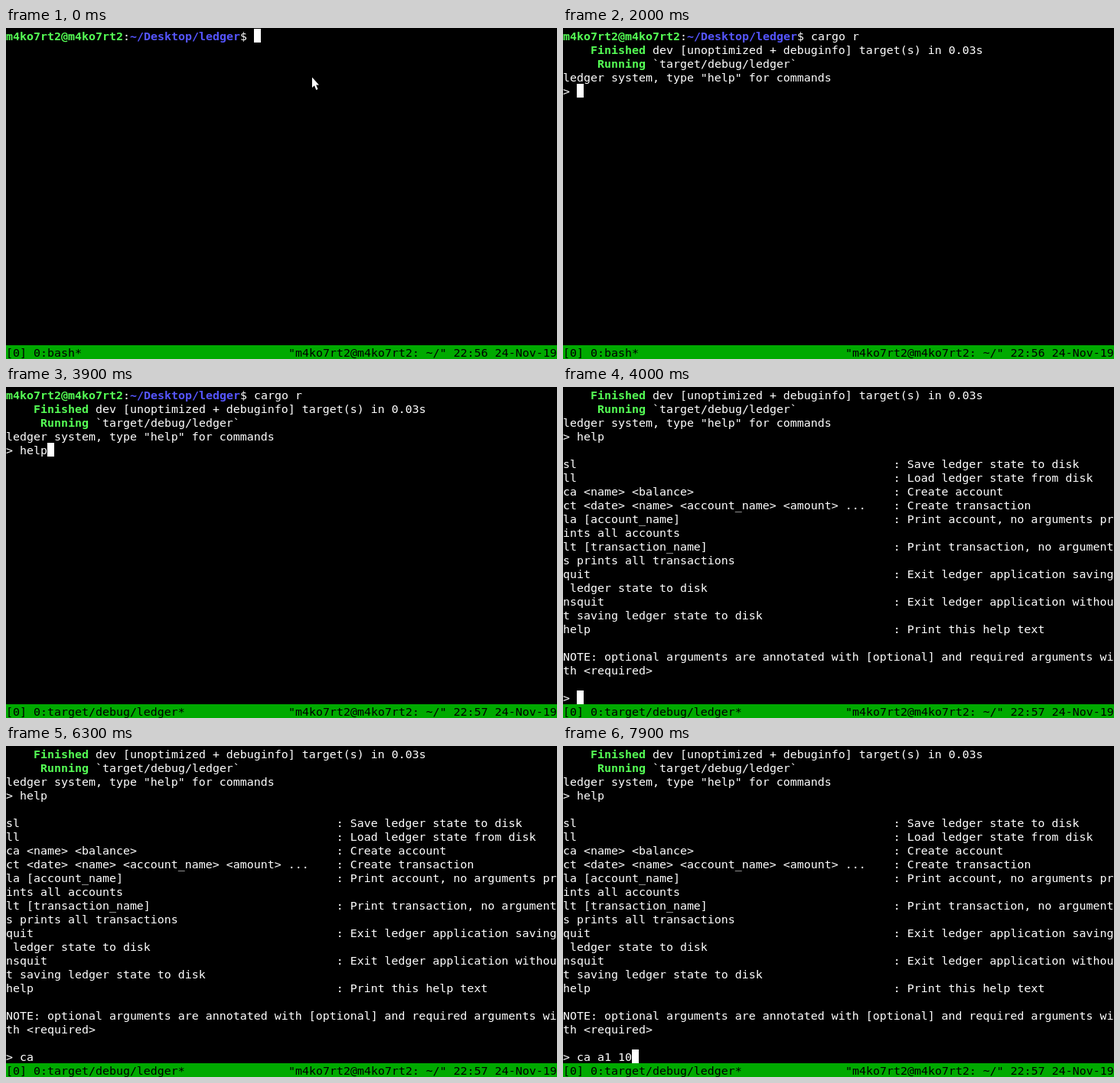
These frames come from a looping animation (720 px wide and 433 px high, 8000 ms). An HTML page with a canvas:

```html
<!DOCTYPE html>
<html lang="en">
<head>
<meta charset="utf-8">
<title>Ledger terminal</title>
<style>
  html, body { margin: 0; width: 100%; height: 100%; overflow: hidden; background: #000; }
  canvas { display: block; }
</style>
</head>
<body>
<canvas id="stage" width="720" height="433"></canvas>
<script>
const ctx = document.getElementById('stage').getContext('2d');
const LOOP = 8000, CW = 9, CH = 18, COLS = 80;
const WHITE = '#fff', GREEN = '#55ff55', BLUE = '#5555ff', BAR = '#00aa00';
const FONT = '14.949px "DejaVu Sans Mono", monospace'; // advance of 9px
const USER = 'm4ko7rt2@m4ko7rt2';

const help = [
  ['sl', 'Save ledger state to disk'],
  ['ll', 'Load ledger state from disk'],
  ['ca <name> <balance>', 'Create account'],
  ['ct <date> <name> <account_name> <amount> ...', 'Create transaction'],
  ['la [account_name]', 'Print account, no arguments prints all accounts'],
  ['lt [transaction_name]', 'Print transaction, no arguments prints all transactions'],
  ['quit', 'Exit ledger application saving ledger state to disk'],
  ['nsquit', 'Exit ledger application without saving ledger state to disk'],
  ['help', 'Print this help text'],
].map(([cmd, text]) => cmd.padEnd(48) + ': ' + text);
const note = 'NOTE: optional arguments are annotated with [optional] and required arguments with <required>';
const helpRows = ['', ...help, '', note, ''].flatMap(wrap);

// [time, screen, typed text, cursor shown]
const steps = [
  [0, 'shell', '', 1], [200, 'shell', '', 0], [300, 'shell', '', 1],
  [400, 'shell', 'c', 1], [500, 'shell', 'ca', 1], [600, 'shell', 'car', 1],
  [900, 'shell', 'cargo', 1], [1500, 'shell', 'cargo', 0], [1600, 'wait', '', 1],
  [2000, 'app', '', 1], [2100, 'app', '', 0], [2700, 'app', '', 1],
  [3100, 'app', 'h', 1], [3400, 'app', 'hel', 1], [3900, 'app', 'help', 1],
  [4000, 'help', '', 1], [5000, 'help', '', 0], [5100, 'help', '', 1],
  [5600, 'help', '', 0], [5700, 'help', 'ca ', 1], [6300, 'help', 'ca ', 0],
  [6400, 'help', 'ca a', 1], [7000, 'help', 'ca a', 0], [7200, 'help', 'ca a', 1],
  [7500, 'help', 'ca a1', 1], [7700, 'help', 'ca a1 ', 1], [7900, 'help', 'ca a1 10', 1],
];

function wrap(line) {
  return line.match(new RegExp(`.{1,${COLS}}`, 'g')) || [''];
}

function write(col, row, text, color = WHITE, bold = false) {
  ctx.font = (bold ? 'bold ' : '') + FONT;
  ctx.fillStyle = color;
  ctx.fillText(text, col * CW, row * CH + 16);
}

function prompt(text) {
  write(0, 0, USER, GREEN, true);
  write(17, 0, ':');
  write(18, 0, '~/Desktop/ledger', BLUE, true);
  write(34, 0, '$ ' + text);
}

function runOutput(row) {
  write(4, row, 'Finished', GREEN, true);
  write(13, row, 'dev [unoptimized + debuginfo] target(s) in 0.03s');
  write(5, row + 1, 'Running', GREEN, true);
  write(13, row + 1, '`target/debug/ledger`');
  write(0, row + 2, 'ledger system, type "help" for commands');
}

function pointer() {
  ctx.fillStyle = WHITE;
  ctx.fill(new Path2D('M400 64.5V78L403 75.3L405.3 81L407.5 80L405.2 74.5H409Z'));
}

function status(t) {
  ctx.fillStyle = BAR;
  ctx.fillRect(0, 415, 720, 18);
  const late = t >= 3100;
  write(0, 23, '[0] 0:' + (late ? 'target/debug/ledger*' : 'bash*'), '#000');
  write(41, 23, `"${USER}: ~/" 22:${late ? 57 : 56} 24-Nov-19`, '#000');
}

function draw(t) {
  const [, screen, typed, cursor] = steps.findLast(s => s[0] <= t);
  let col = 2 + typed.length, row = 4;
  ctx.fillStyle = '#000';
  ctx.fillRect(0, 0, 720, 433);

  if (screen === 'shell') {
    prompt(typed);
    col += 34;
    row = 0;
  } else if (screen === 'wait') {
    prompt('cargo r');
    col = 0;
    row = 1;
  } else if (screen === 'app') {
    prompt('cargo r');
    runOutput(1);
    write(0, row, '> ' + typed);
  } else {
    runOutput(0);
    write(0, 3, '> help');
    helpRows.forEach((line, i) => write(0, 4 + i, line));
    row = 22;
    write(0, row, '> ' + typed);
  }

  if (cursor) {
    ctx.fillStyle = WHITE;
    ctx.fillRect(col * CW, row * CH + 1, CW, CH);
  }
  if (t < 400) pointer();
  status(t);
}

function frame() {
  draw(performance.now() % LOOP);
  requestAnimationFrame(frame);
}
frame();
</script>
</body>
</html>
```
